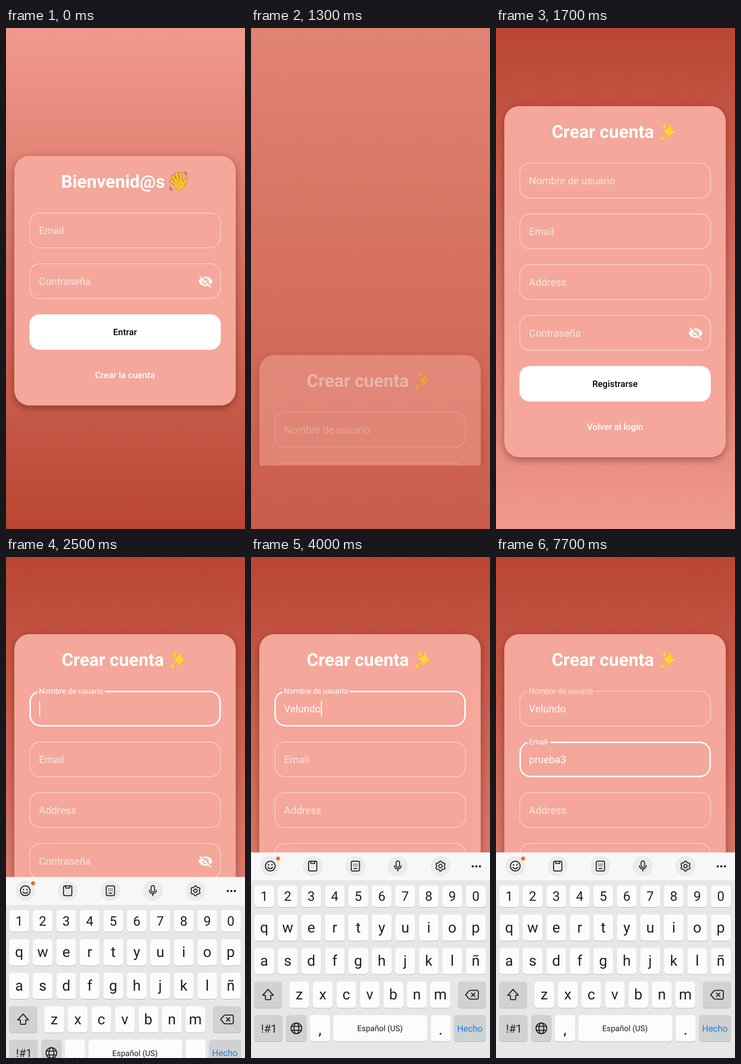
Animation of 490 by 1026 pixels, one loop 8000 ms. Source, as an HTML page:

```html
<!DOCTYPE html>
<html lang="es">
<head>
<meta charset="utf-8">
<title>Crear cuenta</title>
<style>
  html, body { margin: 0; width: 100%; height: 100%; overflow: hidden; background: #d5705f; }
  svg { display: block; }
  #stage { width: 100vw; height: 100vh; font-family: Roboto, sans-serif; text-rendering: geometricPrecision; }
  .card { fill: #f4a79a; filter: drop-shadow(0 5px 8px rgba(50, 0, 0, .38)); }
  .title { font-size: 36.4px; font-weight: 700; fill: #fff; }
  .action { font-size: 18.2px; font-weight: 500; text-anchor: middle; }
  .input { font-size: 20.8px; fill: #fff; }
  .frame { fill: none; stroke: #fff; }
  .key { fill: #fcfcfc; filter: drop-shadow(0 1px .5px rgba(0, 0, 0, .22)); }
  .key.dark { fill: #d0d1d1; }
  .cap { fill: #202020; text-anchor: middle; }
  .icon { fill: none; stroke: #222; stroke-width: 2; stroke-linecap: round; stroke-linejoin: round; }
  .icon .dot { fill: #222; stroke: none; }
</style>
</head>
<body>
<svg id="stage" viewBox="0 0 490 1026" preserveAspectRatio="none">
  <defs>
    <linearGradient id="sky" x1="0" y1="0" x2="0" y2="1"><stop/><stop offset="1"/></linearGradient>
    <clipPath id="below"><rect y="180" width="490" height="846"/></clipPath>
    <clipPath id="above"><rect width="490" height="896"/></clipPath>
  </defs>
  <rect width="490" height="1026" fill="url(#sky)"/>
  <g clip-path="url(#below)"><g id="login"></g></g>
  <g clip-path="url(#above)"><g id="register"></g></g>
  <g id="keyboard"></g>
</svg>
<script>
const LOOP = 8000, STEP = 100;
const USER = 'Velundo', MAIL = 'prueba3';
const CARD = '#f4a79a', LIGHT = [240, 154, 141], DARK = [186, 69, 50];
const FIRST = 152.5, PITCH = 104;
const $ = id => document.getElementById(id);

// ---------- cards ----------

const eye = cy => `<g transform="translate(393.6 ${cy - 15.1}) scale(1.3)" stroke-width="1.8">
  <path fill="#fff" d="M1 12C2.7 7.6 7 4.5 12 4.5S21.3 7.6 23 12C21.3 16.4 17 19.5 12 19.5S2.7 16.4 1 12"/>
  <circle cx="12" cy="12" r="5" fill="${CARD}"/><circle cx="12" cy="12" r="3" fill="#fff"/>
  <path stroke="${CARD}" d="M4 2.5L21 19.5"/><path stroke="#fff" d="M2.6 3.6L20.4 21.4"/></g>`;

const field = (label, i, gap = 0) => {
  const cy = FIRST + i * PITCH;
  return `<g class="field" data-cy="${cy}" data-gap="${gap}">
    <rect class="frame" rx="21"/>
    <rect class="gap" x="64" y="${cy - 38}" height="5" width="0" fill="${CARD}"/>
    <text class="input label">${label}</text>
    <text class="input value" x="67.6" y="${cy + 7.4}"></text>
    <rect class="caret" y="${cy - 16}" width="2" height="32" fill="#fff" visibility="hidden"/>
    ${label === 'Contraseña' ? eye(cy) : ''}</g>`;
};

const card = (title, x, emoji, fields, button, link) => {
  const by = FIRST + fields.length * PITCH, ly = by + 88;
  return `<rect class="card" x="17" width="454" height="${ly + 62.5}" rx="31"/>
    <text class="title" x="${x}" y="65">${title}</text>${emoji}
    ${fields.map(([label, gap], i) => field(label, i, gap)).join('')}
    <rect x="48" y="${by - 36.3}" width="392.4" height="72.8" rx="21" fill="#fff"/>
    <text class="action" x="244" y="${by + 6.4}">${button}</text>
    <rect class="press" x="168" y="${ly - 26}" width="152" height="52" rx="26" fill="#fff" opacity="0"/>
    <text class="action" x="244" y="${ly + 6.4}" fill="#fff">${link}</text>`;
};

const fingers = 'M350 59L338.5 51M351 56L342.5 42.5M354 54L349.5 36.5M359 54L357.5 36M362 61Q365 55 370 47';
const palm = '<ellipse cx="355.5" cy="59" rx="10.5" ry="10"/>';
const hand = `<g stroke-linecap="round">
  <g fill="#b9740f" stroke="#b9740f"><path d="${fingers}" fill="none" stroke-width="6.8"/>${palm}</g>
  <g fill="#fbc530"><path d="${fingers}" fill="none" stroke="#fbc530" stroke-width="5"/>${palm}</g>
  <path d="M347 53l4 5M351 48l3 7M356 47l1 7M353 65q1-6 8-8" fill="none" stroke="#dd961b" stroke-width="1.1"/>
  <path d="M364 34q4 2 5 6M367 32q4 3 5 6M337 62q0 5 4 8M335 66q1 4 4 5" fill="none" stroke="#b8663f" stroke-width="1.6"/>
</g>`;

const star = (x, y, w, h) => `<path transform="translate(${x} ${y}) rotate(8) scale(${w} ${h})"
  d="M0-1Q.12-.12 1 0Q.12.12 0 1Q-.12.12-1 0Q-.12-.12 0-1"/>`;
const sparkles = `<g fill="#fdd92e" stroke="#f3b431" stroke-width=".04">
  ${star(355, 52, 14.5, 16.5)}${star(345.5, 41, 5.5, 7)}${star(341, 65.5, 6.5, 7)}</g>`;

$('login').innerHTML = card('Bienvenid@s', 113, hand,
  [['Email'], ['Contraseña']], 'Entrar', 'Crear la cuenta');
$('register').innerHTML = card('Crear cuenta', 114.3, sparkles,
  [['Nombre de usuario', 139], ['Email', 47], ['Address'], ['Contraseña']], 'Registrarse', 'Volver al login');

// ---------- keyboard ----------

const key = (x, y, w, h, dark) =>
  `<rect class="key ${dark ? 'dark' : ''}" x="${x}" y="${y}" width="${w}" height="${h}" rx="6"/>`;
const cap = (text, x, y, size, fill = '#202020') =>
  `<text class="cap" x="${x}" y="${y}" font-size="${size}" style="fill:${fill}">${text}</text>`;
const keyRow = (chars, x, y, h, size) => [...chars].map((c, i) => {
  const cx = x + i * 48.2;
  return key(cx - 20.2, y, 40.4, h) + cap(c, cx, y + h / 2 + 9.5, size);
}).join('');
const dot = (x, y, r) => `<circle class="dot" cx="${x}" cy="${y}" r="${r}"/>`;
const icon = (x, y, body) => `<g class="icon" transform="translate(${x} ${y})">${body}</g>`;

const gear = 'M' + Array.from({ length: 60 }, (_, i) => {
  const a = i * Math.PI / 30, r = 9 + 1.3 * Math.cos(6 * a);
  return `${(r * Math.sin(a)).toFixed(2)} ${(-r * Math.cos(a)).toFixed(2)}`;
}).join('L') + 'Z';
const pad = [-3.5, 0, 3.5].map(x => dot(x, -4, 1) + dot(x, -.5, 1)).join('');

const tools = [
  [39.5, `<circle r="10"/>${dot(-3.5, -2.5, 1.5)}${dot(3.5, -2.5, 1.5)}<path d="M-5 2.5Q0 8 5 2.5"/>`],
  [126.5, '<rect x="-8.5" y="-10" width="17" height="20" rx="3"/><path d="M-4-10v4.5h8v-4.5"/>'],
  [214, `<rect x="-8.5" y="-10" width="17" height="20" rx="3"/>${pad}<path d="M-3 5h6"/>`],
  [301, '<rect x="-3.5" y="-10.5" width="7" height="13" rx="3.5"/><path d="M-7-1a7 7 0 0 0 14 0M0 6v4"/>'],
  [388.5, `<path d="${gear}"/><circle r="3.5"/>`]
];

$('keyboard').innerHTML = `
  <rect y="605" width="490" height="480" fill="#e6e7e7"/><rect y="605" width="490" height="57" fill="#f7f7f7"/>
  ${tools.map(([x, body]) => `<circle cx="${x}" cy="633" r="20.5" fill="#ebebeb"/>` + icon(x, 633, body)).join('')}
  <circle cx="55.5" cy="617.5" r="4" fill="#f9690e"/>
  ${icon(462, 633.5, [-7.3, 0, 7.3].map(x => dot(x, 0, 2.3)).join(''))}
  ${keyRow('1234567890', 27, 672.5, 44.5, 27)}
  ${keyRow('qwertyuiop', 27, 732, 54, 30)}
  ${keyRow('asdfghjklñ', 27, 801, 53.5, 30)}
  ${keyRow('zxcvbnm', 99, 869.5, 54, 30)}
  ${key(6, 869.5, 58, 54, true)}${key(424, 869.5, 58, 54, true)}
  ${icon(35, 896.5, '<path d="M0-11L11 1H5.5V8.5Q5.5 10 4 10H-4Q-5.5 10-5.5 8.5V1H-11Z"/>')}
  ${icon(453, 896.5, '<path d="M-13 0L-6.5-7.5Q-5-9-3-9H10Q13-9 13-6V6Q13 9 10 9H-3Q-5 9-6.5 7.5ZM-1-3.5l7 7M6-3.5l-7 7"/>')}
  ${key(6, 938, 59, 54, true)}${key(72, 938, 41.5, 54, true)}${key(121, 938, 41, 54)}
  ${key(169, 938, 192, 54)}${key(368.5, 938, 40.5, 54)}${key(416.5, 938, 65.5, 54, true)}
  ${cap('!#1', 37, 973.5, 23)}${cap(',', 141.5, 978, 32)}${cap('.', 388.7, 978, 32)}
  ${cap('Español (US)', 264.5, 971, 16.3)}${cap('Hecho', 448.7, 971.5, 18.2, '#1680ea')}
  ${icon(93, 965.3, '<circle r="11"/><ellipse rx="5" ry="11"/><path d="M-10-4H10M-10 4H10"/>')}`;

// ---------- motion ----------

// Tables of [time, value], linear in between.
const MOVES = {
  loginY: [[1100, 262], [1200, 169], [1300, 90]],
  loginAlpha: [[1100, 1], [1200, .4], [1300, 0]],
  registerY: [[1300, 670], [1400, 382], [1500, 208], [1600, 170], [1700, 160], [1800, 158.5], [1900, 158]],
  registerAlpha: [[1200, 0], [1300, .5], [1400, .97], [1500, 1]],
  flip: [[1200, 0], [1300, .27], [1400, .6], [1500, .86], [1600, .97], [1700, 1]],
  keyboardY: [[2200, 425], [2300, 330], [2400, 150], [2500, 50.5], [2600, 16], [2700, 4], [2800, 0]],
  userFloat: [[2050, 0], [2250, 1]],
  mailFloat: [[4850, 0], [5050, 1]]
};

// [time, letters in the name, letters in the mail, field with the caret]
const TYPING = [
  [0, 0, 0, -1], [2200, 0, 0, 0], [2700, 0, 0, -1], [3200, 0, 0, 0],
  [3300, 1, 0, 0], [3600, 3, 0, 0], [3700, 4, 0, 0], [3900, 6, 0, 0], [4000, 7, 0, 0], [4500, 7, 0, -1],
  [4900, 7, 0, 1], [5400, 7, 0, -1], [5600, 7, 1, 1], [5700, 7, 3, 1], [5800, 7, 4, 1],
  [6000, 7, 5, 1], [6100, 7, 6, 1], [6300, 7, 7, 1], [6800, 7, 7, -1], [7200, 7, 7, 1], [7700, 7, 7, -1]
];

const valueAt = (name, t) => {
  const keys = MOVES[name], i = keys.findIndex(k => k[0] > t);
  if (i === 0) return keys[0][1];
  if (i < 0) return keys[keys.length - 1][1];
  const [t0, a] = keys[i - 1], [t1, b] = keys[i];
  return a + (b - a) * (t - t0) / (t1 - t0);
};
const mix = (a, b, p) => `rgb(${a.map((v, i) => Math.round(v + (b[i] - v) * p))})`;
const set = (el, attrs) => { for (const k in attrs) el.setAttribute(k, attrs[k]); };

function drawField(el, lift = 0, focused = false, text = '', caret = false) {
  const cy = +el.dataset.cy, w = focused ? 3 : 1.4;
  const part = name => el.querySelector('.' + name);
  set(part('frame'), {
    x: 48 + w / 2, y: cy - 36.4 + w / 2, width: 392.4 - w, height: 72.8 - w,
    'stroke-width': w, 'stroke-opacity': focused ? 1 : .52
  });
  set(part('gap'), { width: el.dataset.gap * lift });
  set(part('label'), {
    transform: `translate(67.6 ${cy + 7.4 - 37.6 * lift}) scale(${1 - .255 * lift})`,
    opacity: focused ? 1 : .72
  });
  const value = part('value');
  value.textContent = text;
  set(part('caret'), {
    x: 68 + (text ? value.getComputedTextLength() : 0),
    visibility: caret ? 'visible' : 'hidden'
  });
}

const [skyTop, skyBottom] = document.querySelectorAll('#sky stop');
const fields = [...$('register').querySelectorAll('.field')];
const press = $('login').querySelector('.press');
document.querySelectorAll('.field').forEach(el => drawField(el));

function draw(t) {
  const at = name => valueAt(name, t);
  const flip = at('flip');
  set(skyTop, { 'stop-color': mix(LIGHT, DARK, flip) });
  set(skyBottom, { 'stop-color': mix(DARK, LIGHT, flip) });
  set($('login'), { transform: `translate(0 ${at('loginY')})`, opacity: at('loginAlpha') });
  set($('register'), { transform: `translate(0 ${at('registerY')})`, opacity: at('registerAlpha') });
  set($('keyboard'), { transform: `translate(0 ${at('keyboardY')})` });
  set(press, { opacity: t >= 1200 ? .12 : 0 });

  const [, userLen, mailLen, caret] = TYPING.filter(s => s[0] <= t).pop();
  const focus = t < 2100 ? -1 : t < 4900 ? 0 : 1;
  drawField(fields[0], at('userFloat'), focus === 0, USER.slice(0, userLen), caret === 0);
  drawField(fields[1], at('mailFloat'), focus === 1, MAIL.slice(0, mailLen), caret === 1);
}

const start = performance.now();
let shown = -1;
function tick() {
  // The picture advances ten times a second.
  const t = Math.floor(Math.max(0, performance.now() - start) % LOOP / STEP) * STEP;
  if (t !== shown) draw(shown = t);
  requestAnimationFrame(tick);
}
tick();
</script>
</body>
</html>
```
